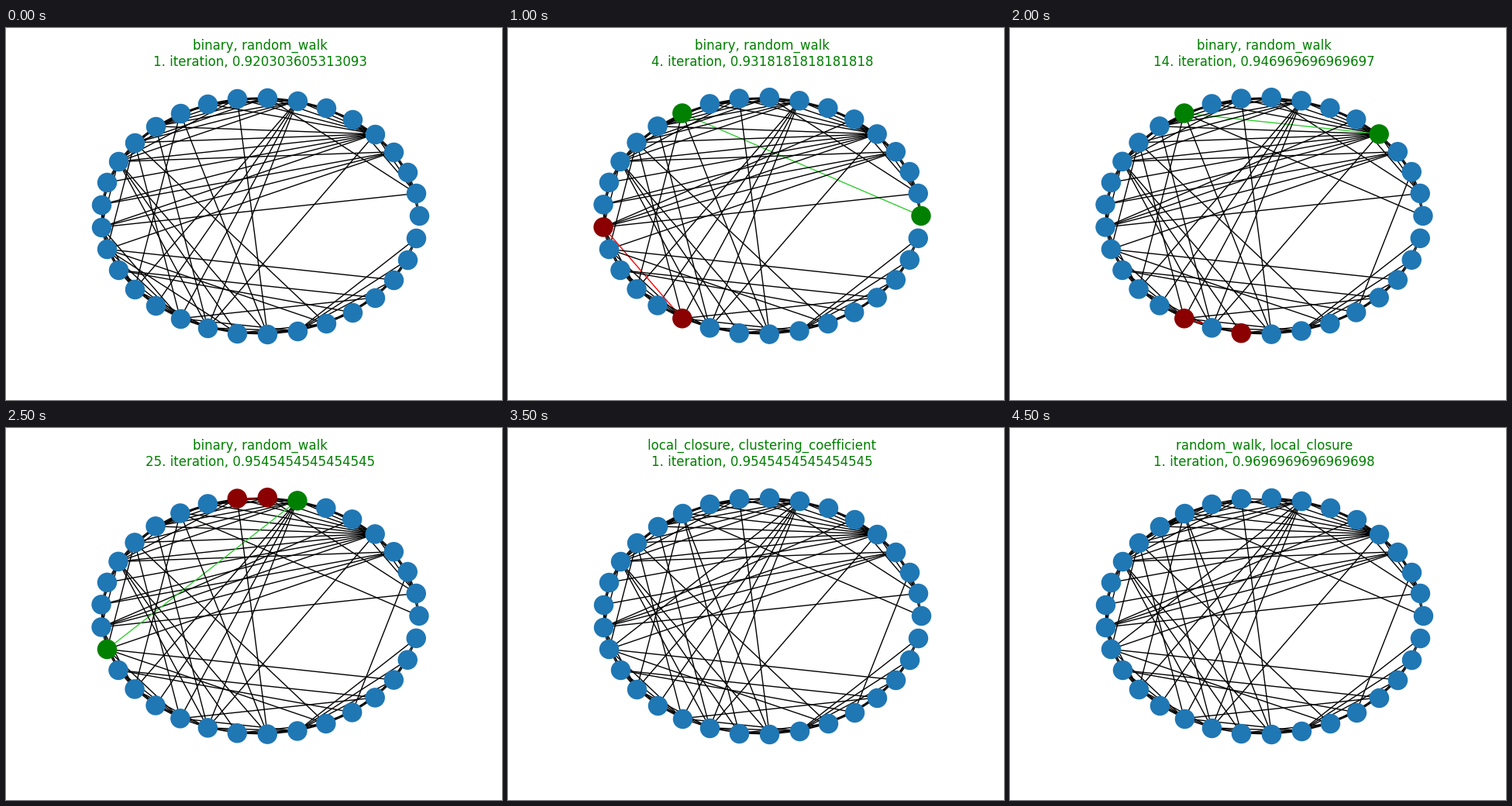
Write a matplotlib script that moves like this. It is 640 px wide and 480 px high and loops after 5 s.

```python
import numpy as np
import matplotlib.pyplot as plt
from matplotlib.animation import FuncAnimation
from matplotlib.collections import LineCollection

NODES = 33
BLUE = "#1f77b4"

# Nodes with long-range links, as spans of reached nodes
FANS = {
    1: [4, 5, 8, 17],
    3: [14, *range(16, 19)],
    4: [*range(7, 18), 23],
    7: [10, *range(12, 15), *range(20, 24)],
    8: [12, 13],
    9: [12, 14, 25],
    11: [14, 20, 25],
    13: [18, 22, 27],
    14: [17, *range(23, 26)],
    18: [22, 24, 27, 30],
    19: [22, 28, 29],
    22: [26, 29],
    23: [12, 20, 26],
    17: [20, 22],
    24: [27],
    26: range(30, 33),
}

WALK = "binary, random_walk"
CLOSURE = "local_closure, clustering_coefficient"
MIXED = "random_walk, local_closure"

# (method, iteration, score, added edge, removed edge)
STEPS = [
    (WALK, 1, "0.920303605313093", None, None),
    (WALK, 2, "0.9278937381404173", (5, 17), (18, 24)),
    (WALK, 4, "0.9318181818181818", (0, 11), (17, 22)),
    (WALK, 8, "0.9393939393939394", (2, 28), (8, 13)),
    (WALK, 14, "0.946969696969697", (4, 11), (22, 24)),
    (WALK, 25, "0.9545454545454545", (7, 18), (8, 9)),
    (WALK, 28, "0.9659090909090909", (11, 24), (4, 16)),
    (CLOSURE, 1, "0.9545454545454545", None, None),
    (CLOSURE, 2, "0.9621212121212122", (10, 13), (8, 10)),
    (MIXED, 1, "0.9696969696969698", None, None),
]

angle = 2 * np.pi * np.arange(NODES) / NODES
pos = np.column_stack([np.cos(angle), np.sin(angle)])


def padded(values):
    mid = (values.min() + values.max()) / 2
    half = 1.21 * np.ptp(values) / 2
    return mid - half, mid + half


def start_edges():
    """Each node joined to its next two, plus the fans."""
    near = {(i, i + d) for d in (1, 2) for i in range(NODES - d)}
    far = {(min(a, b), max(a, b)) for a, ends in FANS.items() for b in ends}
    return (near | far) - {step[3] for step in STEPS}


def edges_at(step):
    """Edges on show at a step, including the one about to go."""
    edges = start_edges()
    for i, (*_, added, removed) in enumerate(STEPS[:step + 1]):
        if added:
            edges.add(added)
            if i < step:
                edges.discard(removed)
    return sorted(edges)


fig, ax = plt.subplots(figsize=(6.4, 4.8), dpi=100)


def draw(step):
    method, count, score, added, removed = STEPS[step]
    ax.clear()
    ax.set_axis_off()

    edges = edges_at(step)
    edge_colors = {added: "limegreen", removed: "red"}
    ax.add_collection(LineCollection(
        [pos[list(e)] for e in edges], linewidths=1.0, zorder=1,
        colors=[edge_colors.get(e, "black") for e in edges]))

    node_colors = BLUE
    if added:
        node_colors = [BLUE] * NODES
        for pair, color in ((added, "green"), (removed, "darkred")):
            for n in pair:
                node_colors[n] = color
    ax.scatter(*pos.T, s=300, color=node_colors, zorder=2)

    ax.set_xlim(padded(pos[:, 0]))
    ax.set_ylim(padded(pos[:, 1]))
    ax.set_title(f"{method}\n{count}. iteration, {score}", color="green")
    return []


anim = FuncAnimation(fig, draw, frames=len(STEPS), interval=500,
                     init_func=lambda: draw(0), repeat=True, repeat_delay=0)
plt.show()
```
